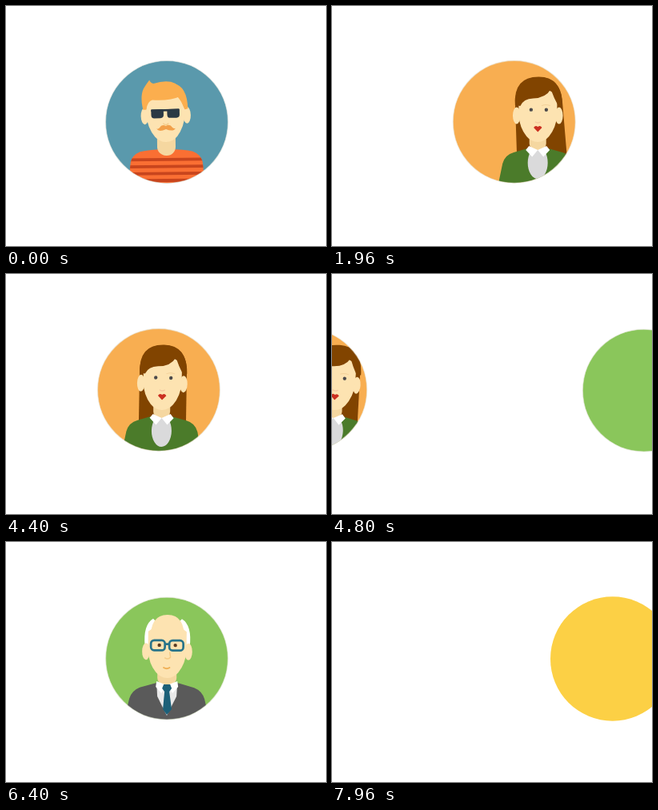
Animation of 400 by 300 pixels, one loop 8000 ms. Source, as an HTML page with a canvas:

```html
<!DOCTYPE html>
<html lang="en">
<head>
<meta charset="utf-8">
<title>Avatars</title>
<style>
html, body { margin: 0; width: 100%; height: 100%; overflow: hidden; background: #fff; }
canvas { display: block; width: 400px; height: 300px; }
</style>
</head>
<body>
<canvas id="stage" width="400" height="300"></canvas>
<script>
const ctx = document.getElementById('stage').getContext('2d');
const LOOP = 8000, STEP = 3120, FIRST = 1095 - STEP, SLIDE = 1150;
const CX = 201, SKIN = '#fde3b1', SHADE = '#f5d7a0';

const clamp = (v, a = 0, b = 1) => Math.min(b, Math.max(a, v));

// Symmetric ease: cubic-bezier(.66, 0, .34, 1)
function ease(x) {
  x = clamp(x);
  let lo = 0, hi = 1;
  for (let i = 0; i < 22; i++) {
    const u = (lo + hi) / 2, v = 1 - u;
    if (1.98 * u * v * v + 1.02 * u * u * v + u * u * u < x) lo = u; else hi = u;
  }
  return lo * lo * (3 - 2 * lo);
}

function shape(color, d) {
  ctx.fillStyle = color;
  ctx.fill(new Path2D(d));
}

function line(color, width, d) {
  ctx.strokeStyle = color;
  ctx.lineWidth = width;
  ctx.lineCap = ctx.lineJoin = 'round';
  ctx.stroke(new Path2D(d));
}

function oval(color, x, y, rx, ry = rx) {
  ctx.fillStyle = color;
  ctx.beginPath();
  ctx.ellipse(x, y, rx, ry, 0, 0, Math.PI * 2);
  ctx.fill();
}

function box(color, x, y, w, h, r) {
  ctx.fillStyle = color;
  ctx.beginPath();
  ctx.roundRect(x, y, w, h, r);
  ctx.fill();
}

function turned(deg, x, y, draw) {
  ctx.save();
  ctx.translate(x, y);
  ctx.rotate(deg * Math.PI / 180);
  ctx.translate(-x, -y);
  draw();
  ctx.restore();
}

function face(turn) {
  oval(SKIN, 174.5 - turn, 137, 4.8, 10.5);
  oval(SKIN, 227.5 - turn * .3, 137, 4.8, 10.5);
  shape(SKIN, 'M177 112 Q201 92 225 112 L225 136 Q224 152 215 163 Q209 170 201 170 Q193 170 187 163 Q178 152 177 136 Z');
}

const hipster = {
  color: '#5a99ac', cy: 145, r: 76.5,
  body() {
    const torso = 'M153 226 L156 195 Q158 186 168 182 Q180 179 201 179 Q222 179 234 182 Q244 186 246 195 L249 226 Z';
    shape('#fa6f33', torso);
    ctx.save();
    ctx.clip(new Path2D(torso));
    ctx.fillStyle = '#c8451d';
    for (let y = 190; y < 224; y += 8.7) ctx.fillRect(150, y, 102, 3.8);
    ctx.restore();
    box(SHADE, 189.5, 158, 23, 29, [0, 0, 11, 11]);
  },
  head({ turn }) {
    face(turn);
    shape('#fbae4e', 'M173 129 Q169 109 176 100 Q178 97 182 92 Q183 96 187 96.5 Q204 92 214 97 Q218 100 219 104 Q224 111 229 127 L226 130 Q221 124 221 113 Q207 119 185 117 Q179 118 177 129 Z');
    shape('#fbae4e', 'M212 97 Q229 101 229 129 L225 130 Q222 119 214 111 Z');
    box('#2b3944', 183, 129, 15.5, 11, [1, 1, 4, 4]);
    box('#2b3944', 203, 129, 15.5, 11, [1, 1, 4, 4]);
    ctx.fillRect(183, 129, 35, 2.6);
    line('#f4cd8c', 1.4, 'M198 147 Q201 150 204 147');
    shape('#f2a04a', 'M201 150 Q206 147 209 152 Q211 154 213 153 Q210 158 201 154 Q192 158 189 153 Q191 154 193 152 Q196 147 201 150 Z');
  }
};

const lady = {
  color: '#f8ae51', cy: 144.8, r: 76.5,
  back({ drag }) {
    shape('#814400', `M172.5 118 L${172.5 + drag * .4} 186 L${231.5 + drag} 186 L231.5 118 Q229 89 202 89 Q175 89 172.5 118 Z`);
  },
  body() {
    shape('#4b7b2a', 'M151 226 L157 197 Q160 186 171 183 L188 178 L214 178 L232 183 Q243 186 246 197 L251 226 Z');
    oval('#dadadb', 201, 196, 12.5, 20);
    box(SHADE, 190.5, 158, 21, 22, [0, 0, 8, 8]);
    shape('#fff', 'M190 175 L201 180 L194 188.5 L186 180 Z M212 175 L201 180 L208 188.5 L216 180 Z');
  },
  head({ blink, turn }) {
    face(turn);
    shape('#814400', 'M172.5 124 Q170 88.5 202 88.5 Q231 88.5 231.5 124 L226 124 Q221 115 217 104 Q211 115 195 115.5 Q183 116 179 125 Z');
    line('#f3d19a', 1, 'M206 124.5 Q211 122.5 216 124.5');
    for (const x of [192.5, 211.5]) {
      if (blink) line('#6b5848', 1.3, `M${x - 2.3} 130.5 h4.6`);
      else oval('#4c4a4b', x, 129.7, 2.2);
    }
    line('#f6c9a0', 1.3, 'M198 145 Q201 147 204 145');
    shape('#cb2f20', 'M201 157.5 L195.8 152 Q198 148.5 201 151 Q204 148.5 206.2 152 Z');
  }
};

const elder = {
  color: '#8ac65b', cy: 145.6, r: 76.4,
  body() {
    shape('#5a5a5a', 'M146 230 L154 196 Q157 186 167 182 L188 176 L214 176 L235 182 Q245 186 248 196 L256 230 Z');
    shape('#e9e9e9', 'M188 176 L214 176 L213 193 L201 217 L189 193 Z');
    box(SHADE, 189, 158, 24, 20, [0, 0, 8, 8]);
    shape('#fff', 'M188 174 L201 179 L194 189 L187 181 Z M214 174 L201 179 L208 189 L215 181 Z');
    shape('#1c6078', 'M197 178 L205 178 L207 183 L204 187 L207 209 L201 216 L196 209 L198 187 L195 183 Z');
  },
  head({ glance, turn }) {
    shape('#fff', 'M173 131 Q170 104 183 96 L191 104 L180 131 Z M229 131 Q232 104 219 96 L211 104 L222 131 Z');
    face(turn);
    shape(SKIN, 'M180 122 Q179 91 201 91 Q223 91 222 122 Z');
    for (const x of [191, 211]) oval('#5b3b23', x - glance * 2.5, 129, 2.2);
    ctx.strokeStyle = '#28748a';
    ctx.lineWidth = 2.7;
    ctx.beginPath();
    ctx.roundRect(180.5, 123, 17.5, 12.5, 4);
    ctx.roundRect(203.5, 123, 17.5, 12.5, 4);
    ctx.moveTo(198, 127.5);
    ctx.lineTo(203.5, 127.5);
    ctx.stroke();
    ctx.translate(turn, 0);
    line('#f4cb87', 1.5, 'M198 145 Q202 147.5 205 144 L204 138');
    line('#f0b055', 1.8, `M196.5 157 Q200.5 ${159.5 + glance * 1.5} 204 157`);
  }
};

const blank = { color: '#fcd045', cy: 146, r: 77.7 };
const cast = [hipster, lady, elder, blank];

// Whole-figure lean: trails while sliding in, then swings out to rest
function lean(age) {
  const s = Math.max(age, 742) - 992;
  const fade = clamp(1 - s / 1488);
  return -14.5 * Math.min(1, Math.pow(fade, 1.8)) * Math.cos(s / 500 * Math.PI * 2);
}

function drawAvatar(who, age, t) {
  const left = age - STEP;
  if (age < 0 || left > SLIDE) return;
  const enter = 400 * (1 - ease(age / SLIDE));
  const exit = time => 470 * ease((time - 12) / SLIDE);
  const x = CX + enter - exit(left);

  ctx.save();
  ctx.beginPath();
  ctx.arc(x, who.cy, who.r, 0, Math.PI * 2);
  ctx.fillStyle = who.color;
  ctx.fill();
  if (who.head) {
    ctx.save();
    ctx.clip();
    ctx.translate(enter * 2.1 - exit(left - 28), 0);
    const tilt = left > 0 ? Math.min(8, left / 130) : lean(age);
    const pose = {
      drag: Math.min(8, enter * .22),
      turn: tilt * .25,
      blink: t >= 3760 && t < 3840,
      glance: Math.sin(Math.PI * clamp((t - 6740) / 340))
    };
    turned(tilt * .4, CX, 222, () => {
      if (who.back) turned(tilt * .3, CX, 172, () => who.back(pose));
      who.body();
      turned(tilt * .6, CX, 172, () => who.head(pose));
    });
    ctx.restore();
    ctx.beginPath();
    ctx.arc(x, who.cy, who.r, 0, Math.PI * 2);
    ctx.strokeStyle = 'rgba(232,232,222,.6)';
    ctx.lineWidth = 1.2;
    ctx.stroke();
  }
  ctx.restore();
}

function frame(now) {
  const t = now % LOOP;
  ctx.fillStyle = '#fff';
  ctx.fillRect(0, 0, 400, 300);
  cast.forEach((who, i) => drawAvatar(who, t - FIRST - i * STEP, t));
  requestAnimationFrame(frame);
}
requestAnimationFrame(frame);
</script>
</body>
</html>
```
